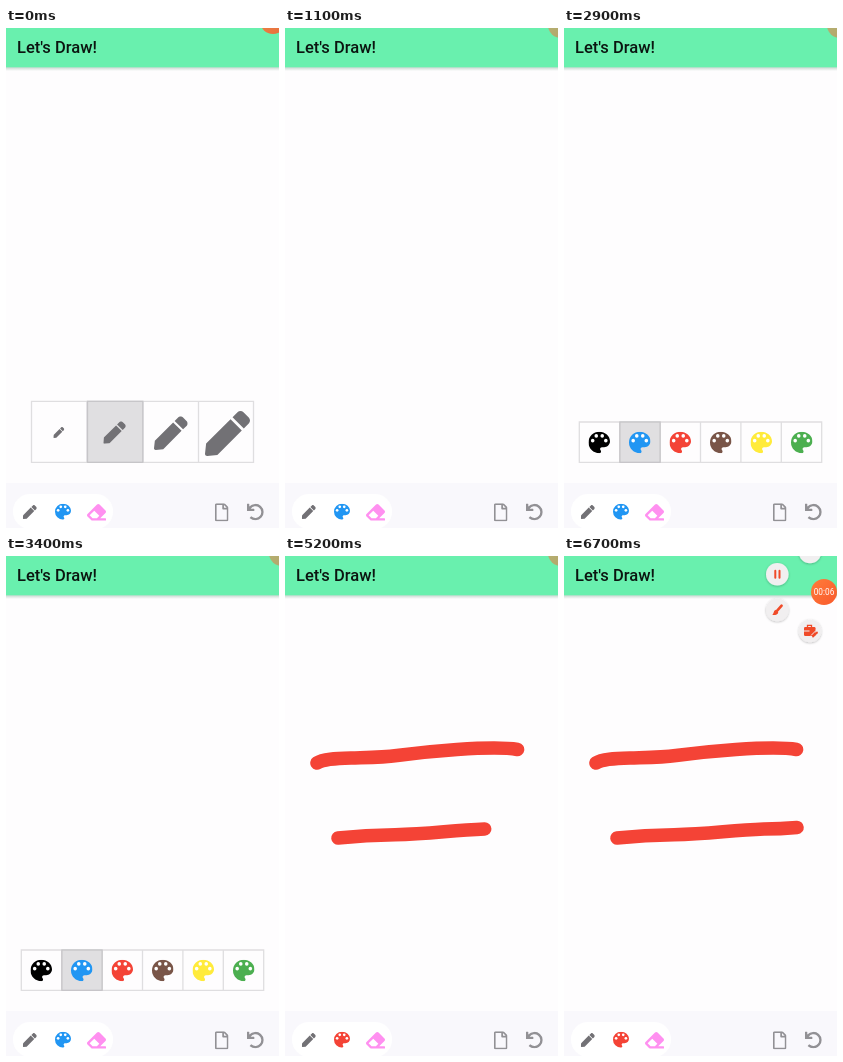
These frames come from a looping animation (273 by 500 pixels, 6900 ms). An HTML page:

```html
<!DOCTYPE html>
<html lang="en">
<head>
<meta charset="utf-8">
<title>Drawing app</title>
<style>
html, body { margin: 0; width: 100%; height: 100%; overflow: hidden; background: #fefdfe; }
svg.stage { display: block; width: 100vw; height: 100vh; }
text { font-family: Roboto, sans-serif; }

.panel { fill: none; stroke: #dfdee0; stroke-width: 1.3; }
.chosen { fill: #e0dfe1; stroke: #c6c5c8; stroke-width: 1.3; }
.gray { fill: #727175; }
.line { fill: none; stroke: #f44336; stroke-width: 13.6; stroke-linecap: round; stroke-linejoin: round; stroke-dasharray: 100 300; }

.anim { animation: 6900ms step-end infinite; }
.pens { animation-name: pens; }
.pick { animation-name: pick; }
.colors { animation-name: colors; }
.tint { animation-name: tint; }
.first { animation-name: first; }
.second { animation-name: second; }
.bubble { animation-name: bubble; }
.clock { animation-name: clock; }
.fan { animation-name: fan; transform-box: fill-box; transform-origin: center; }

@keyframes pens {
  0% { visibility: visible; }
  7.24% { visibility: hidden; }
  23.18% { visibility: visible; }
  34.78%, 100% { visibility: hidden; }
}
@keyframes pick {
  0% { transform: translateX(56px); }
  7.24%, 100% { transform: none; }
}
@keyframes colors {
  0% { visibility: hidden; }
  42.02% { visibility: visible; }
  50.72%, 100% { visibility: hidden; }
}
@keyframes tint {
  0% { fill: #2196f3; }
  50.72%, 100% { fill: #f44336; }
}
@keyframes first {
  0% { visibility: hidden; stroke-dashoffset: 99.7; }
  62.31% { visibility: visible; stroke-dashoffset: 99.7; }
  63.76% { visibility: visible; stroke-dashoffset: 72; }
  65.21% { visibility: visible; stroke-dashoffset: 38; }
  66.66% { visibility: visible; stroke-dashoffset: 14; }
  68.11% { visibility: visible; stroke-dashoffset: 4; }
  69.56%, 100% { visibility: visible; stroke-dashoffset: 0; }
}
@keyframes second {
  0% { visibility: hidden; stroke-dashoffset: 99.7; }
  73.91% { visibility: visible; stroke-dashoffset: 62; }
  75.36% { visibility: visible; stroke-dashoffset: 18.5; }
  76.81% { visibility: visible; stroke-dashoffset: 9; }
  78.26% { visibility: visible; stroke-dashoffset: 4; }
  79.71% { visibility: visible; stroke-dashoffset: 1; }
  81.15%, 100% { visibility: visible; stroke-dashoffset: 0; }
}
@keyframes bubble {
  0% { transform: translate(267px, -7px); opacity: .88; animation-timing-function: steps(7, end); }
  10.14% { transform: translate(276px, -3px); opacity: .88; animation-timing-function: steps(4, end); }
  15.94% { transform: translate(276px, -3px); opacity: .52; }
  89.85% { transform: translate(272px, 6px); opacity: 1; }
  91.3% { transform: translate(265px, 24px); opacity: 1; }
  92.75%, 100% { transform: translate(260px, 36px); opacity: 1; }
}
@keyframes clock {
  0% { visibility: hidden; }
  89.85%, 100% { visibility: visible; }
}
@keyframes fan {
  0% { visibility: hidden; transform: translate(var(--x), var(--y)) scale(.3); }
  92.75% { visibility: visible; transform: translate(var(--x), var(--y)) scale(.3); animation-timing-function: steps(3, end); }
  97.1%, 100% { visibility: visible; transform: none; }
}
</style>
</head>
<body>
<svg class="stage" viewBox="0 0 273 500" preserveAspectRatio="none">
  <defs>
    <linearGradient id="shade" x2="0" y2="1">
      <stop stop-color="#c5d5cd"/><stop offset="1" stop-color="#fefdfe"/>
    </linearGradient>
    <linearGradient id="glow" x2="1" y2="1">
      <stop stop-color="#ff7c3a"/><stop offset="1" stop-color="#f95a2c"/>
    </linearGradient>
    <filter id="soft" x="-30%" y="-30%" width="160%" height="160%">
      <feDropShadow dx="0" dy=".7" stdDeviation=".9" flood-opacity=".28"/>
    </filter>
    <symbol id="pen" viewBox="0 0 512 512">
      <path d="M290.7 93.2l128 128-278 278-114 12.6C11.4 513.5-1.6 500.6.1 485.3l12.7-114.2zM497.9 74.2l-60.1-60.1c-18.7-18.8-49.1-18.8-67.9 0l-56.5 56.5 128 128 56.5-56.5c18.8-18.8 18.8-49.2 0-67.9z"/>
    </symbol>
    <symbol id="palette" viewBox="3 3 18 18">
      <path d="M12 3a9 9 0 0 0 0 18c.83 0 1.5-.67 1.5-1.5 0-.39-.15-.74-.39-1.01-.23-.26-.38-.61-.38-.99 0-.83.67-1.5 1.5-1.5H16c2.76 0 5-2.24 5-5 0-4.42-4.03-8-9-8z"/>
      <g fill="#fff"><circle cx="6.5" cy="10.5" r="1.5"/><circle cx="9.5" cy="6.5" r="1.5"/><circle cx="14.5" cy="6.5" r="1.5"/><circle cx="17.5" cy="10.5" r="1.5"/></g>
    </symbol>
    <symbol id="eraser" viewBox="0 0 512 512">
      <path d="M498 274c18.7-18.8 18.7-49.2 0-68L338 46c-18.8-18.7-49.2-18.7-68 0L14 302c-18.7 18.8-18.7 49.2 0 68l96 96a48 48 0 0 0 34 14h356a12 12 0 0 0 12-12v-40a12 12 0 0 0-12-12H356zM195.300 211.300l137.400 137.400L265.400 416H150.600l-80-80z"/>
    </symbol>
    <symbol id="page" viewBox="0 0 384 512">
      <path fill-rule="evenodd" d="M370 98L286 14A48 48 0 0 0 252 0H48A48 48 0 0 0 0 48v416a48 48 0 0 0 48 48h288a48 48 0 0 0 48-48V132a48 48 0 0 0-14-34zM332 128H256V52zM48 464V48h160v104a24 24 0 0 0 24 24h104v288z"/>
    </symbol>
    <symbol id="undo" viewBox="0 0 512 512">
      <path d="M212 224H12a12 12 0 0 1-12-12V12A12 12 0 0 1 12 0h48a12 12 0 0 1 12 12v78A248 248 0 1 1 90 440a12 12 0 0 1-1-17l34-34a12 12 0 0 1 17-1A176 176 0 1 0 114 152h98a12 12 0 0 1 12 12v48a12 12 0 0 1-12 12z"/>
    </symbol>
  </defs>

  <rect width="273" height="500" fill="#fefdfe"/>
  <rect y="39" width="273" height="4" fill="url(#shade)"/>
  <rect width="273" height="39.300" fill="#69f0ae"/>
  <text x="11" y="25" font-size="16.500" font-weight="500" fill="#0b1510">Let's Draw!</text>

  <path class="line anim first" pathLength="100" d="M32 207C38 203 50 202.500 66 202C82 201.500 98 201.500 112 199.500C135 196.500 150 195 172 193.500C195 192 218 191 232.500 193.500"/>
  <path class="line anim second" pathLength="100" d="M53 282C72 280 90 279 110 278.800C145 278 165 274.500 200 273C212 273 222 272.500 233 271.500"/>

  <rect y="455" width="273" height="45" fill="#f9f8fc"/>
  <rect x="7" y="466" width="100" height="35" rx="17" fill="#fff"/>
  <use href="#pen" x="16.800" y="477" width="14" height="14" class="gray"/>
  <use href="#palette" x="49" y="475.700" width="16" height="16" class="anim tint"/>
  <use href="#eraser" x="81" y="474.800" width="19" height="19" fill="#ff90f0"/>
  <g fill="#929195">
    <use href="#page" x="208.900" y="475.200" width="13.600" height="18.200"/>
    <use href="#undo" x="240.900" y="475.600" width="17" height="17"/>
  </g>

  <g class="anim pens">
    <path class="panel" d="M25.500 373.300H247.500V434.300H25.500zM81 373.300V434.300M137 373.300V434.300M192.500 373.300V434.300"/>
    <rect class="chosen anim pick" x="25.500" y="373.300" width="55.300" height="61"/>
    <g class="gray">
      <use href="#pen" x="47.300" y="399" width="11" height="11"/>
      <use href="#pen" x="97.300" y="393.300" width="22.500" height="22.500"/>
      <use href="#pen" x="148" y="388.300" width="33.700" height="33.700"/>
      <use href="#pen" x="199" y="383" width="45" height="45"/>
    </g>
  </g>

  <g class="anim colors">
    <path class="panel" d="M15.300 394H257.700V434.300H15.300zM55.700 394V434.300M96.100 394V434.300M136.500 394V434.300M176.900 394V434.300M217.300 394V434.300"/>
    <rect class="chosen" x="55.900" y="394" width="40.200" height="40.300"/>
    <use href="#palette" x="24.500" y="403.700" width="21.500" height="21.500"/>
    <use href="#palette" x="65" y="403.700" width="21.500" height="21.500" fill="#2196f3"/>
    <use href="#palette" x="105.500" y="403.700" width="21.500" height="21.500" fill="#f44336"/>
    <use href="#palette" x="146" y="403.700" width="21.500" height="21.500" fill="#795548"/>
    <use href="#palette" x="186.500" y="403.700" width="21.500" height="21.500" fill="#ffeb3b"/>
    <use href="#palette" x="227" y="403.700" width="21.500" height="21.500" fill="#4caf50"/>
  </g>

  <g fill="#f1eff0">
    <g class="anim fan" style="--x: 14px; --y: 40px">
      <circle cx="246" cy="-4" r="11.300" filter="url(#soft)"/>
    </g>
    <g class="anim fan" style="--x: 47px; --y: 18px">
      <circle cx="213.300" cy="18.200" r="11.300" filter="url(#soft)"/>
      <path d="M211.300 14.800v7M215.500 14.800v7" stroke="#f04a28" stroke-width="2" stroke-linecap="round"/>
    </g>
    <g class="anim fan" style="--x: 47px; --y: -18px">
      <circle cx="213.300" cy="54" r="11.300" filter="url(#soft)"/>
      <path d="M217.600 49.700l-4.400 5" stroke="#f04a28" stroke-width="2.600" stroke-linecap="round"/>
      <path d="M211.300 53.700l3 2.700c-.7 2.300-3 2.800-6 2.500 1.600-1.400 1-3.600 3-5.200z" fill="#f04a28"/>
    </g>
    <g class="anim fan" style="--x: 14px; --y: -39px">
      <circle cx="246" cy="75" r="11.300" filter="url(#soft)"/>
      <path d="M243.500 71v-1.700h4V71" fill="none" stroke="#f04a28" stroke-width="1.300"/>
      <rect x="240" y="71" width="11.500" height="9" rx="1.200" fill="#f04a28"/>
      <path d="M240 75h5.500M247 79.500l5-5" stroke="#f1eff0" stroke-width="1"/>
      <path d="M249 80.500l4-4" stroke="#f04a28" stroke-width="1.800" stroke-linecap="round"/>
    </g>
  </g>

  <g class="anim bubble">
    <circle r="13" fill="url(#glow)"/>
    <text class="anim clock" y="3" font-size="8.300" fill="#fff" text-anchor="middle">00:06</text>
  </g>
</svg>
</body>
</html>
```
